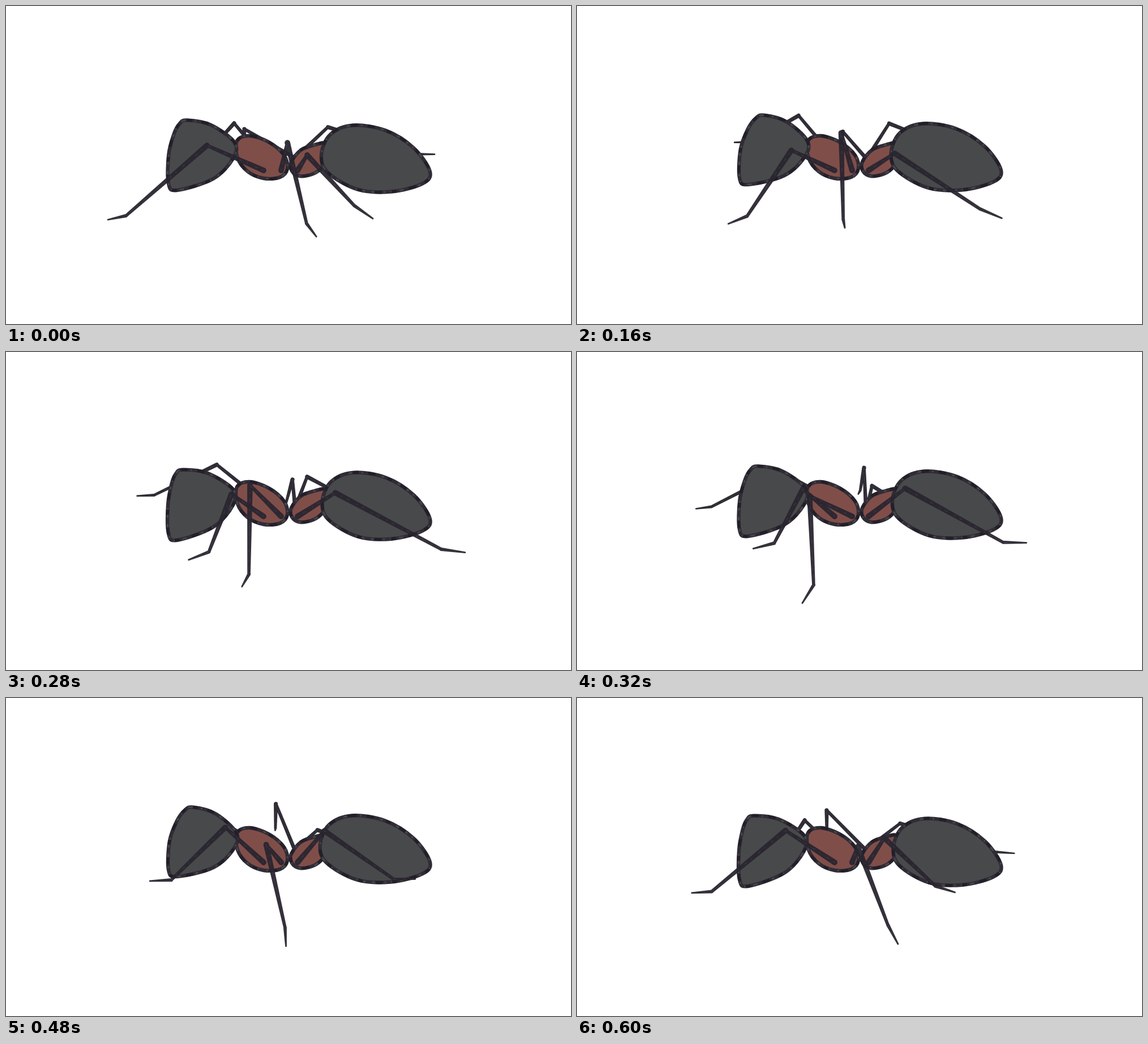
An HTML page with a canvas for the animation above (640 ms loop, 998x561 px).

```html
<!DOCTYPE html>
<html lang="en">
<head>
<meta charset="utf-8">
<title>Walking ant</title>
<style>
html, body { margin: 0; width: 100%; height: 100%; overflow: hidden; background: #fff; }
canvas { display: block; width: 998px; height: 561px; }
</style>
</head>
<body>
<canvas id="stage" width="998" height="561"></canvas>
<script>
const ctx = document.getElementById('stage').getContext('2d');
const STEP = 40, STEPS = 16;
const INK = '#302c35', DARK = '#231f2a', GREY = '#47454c', SHELL = '#48494a', RED = '#804e49';
const NEAR_INK = 'rgba(42,37,48,.95)';
const NEAR_RADII = [5, 3, 4.9, 2.8, 3, 1.4], FAR_RADII = [3.4, 2.8, 3.6, 2.4, 2.5, 1.3];

// Every joint glides in a line [from, to] while the foot is planted, then swings back raised by lift.
// The far twin walks half a stride later, shifted, with the part below the knee flattened.
const legs = [
  { hip: [455, 290], start: 0, plant: 6.6,
    knee: { from: [355, 246], to: [394, 260], lift: [16, -24] },
    ankle: { from: [212, 370], to: [358, 371], lift: [18, -50] },
    toe: { from: [180, 377], to: [324, 389], lift: [13, -60] },
    far: { hip: [445, 257], shift: [4, -35], flat: [.85, .5] } },
  { hip: [486, 290], start: 8, plant: 7,
    knee: { from: [411, 254], to: [496, 262], lift: [18, -34] },
    ankle: { from: [418, 411], to: [549, 400], lift: [-6, -30] },
    toe: { from: [398, 443], to: [567, 434], lift: [0, -48] },
    far: { hip: [510, 268], shift: [10, -37], flat: [-.2, .28] } },
  { hip: [515, 290], start: 0, plant: 6.6,
    knee: { from: [532, 263], to: [580, 258], lift: [10, -27] },
    ankle: { from: [615, 352], to: [775, 362], lift: [2, -37] },
    toe: { from: [648, 375], to: [817, 374], lift: [3, -56] },
    far: { hip: [515, 264], shift: [-11, -27], flat: [.88, .5] } }];

const head = [[325, 197], [366, 207], [405, 239], [402, 267], [366, 302],
  [302, 320], [287, 308], [288, 258], [299, 222], [311, 203]];
const abdomen = [[612, 209], [670, 218], [720, 249], [749, 291], [735, 312],
  [680, 326], [620, 322], [567, 292], [556, 260], [572, 225]];
const thorax = [[408, 238], [430, 229], [464, 240], [491, 263], [497, 287],
  [484, 302], [455, 304], [427, 292], [409, 268]];
const waist = [[504, 275], [521, 254], [545, 245], [566, 243], [570, 268],
  [555, 288], [540, 297], [519, 300], [505, 291]];

const mix = (a, b, u) => a.map((v, i) => v + (b[i] - v) * u);

function glide({ from, to, lift }, time, plant) {
  if (time < plant) return mix(from, to, time / plant);
  const u = (time - plant) / (STEPS - plant);
  const rise = Math.sqrt(Math.sin(Math.PI * u));
  return mix(to, from, u).map((v, i) => v + lift[i] * rise);
}

function joints(leg, step) {
  const time = (step - leg.start + STEPS) % STEPS;
  return [leg.knee, leg.ankle, leg.toe].map(j => glide(j, time, leg.plant));
}

function farJoints(leg, step) {
  const pose = joints(leg, (step + STEPS / 2) % STEPS), knee = pose[0];
  const { shift, flat } = leg.far;
  return pose.map(p => p.map((v, i) => knee[i] + shift[i] + flat[i] * (v - knee[i])));
}

function closedCurve(points) {
  const n = points.length, at = k => points[(k + n) % n];
  ctx.beginPath();
  ctx.moveTo(...points[0]);
  for (let i = 0; i < n; i++) {
    const [a, b, c, d] = [at(i - 1), at(i), at(i + 1), at(i + 2)];
    ctx.bezierCurveTo(b[0] + (c[0] - a[0]) / 6, b[1] + (c[1] - a[1]) / 6,
      c[0] - (d[0] - b[0]) / 6, c[1] - (d[1] - b[1]) / 6, ...c);
  }
  ctx.closePath();
}

function strokeLine(color, width, dash) {
  ctx.strokeStyle = color;
  ctx.lineWidth = width;
  ctx.setLineDash(dash);
  ctx.stroke();
}

// Filled shape with a patchy marker outline
function blob(points, fill) {
  closedCurve(points);
  ctx.fillStyle = fill;
  ctx.fill();
  strokeLine(INK, 6.4, []);
  strokeLine(GREY, 3, [5, 9, 3, 14, 8, 11]);
  strokeLine(DARK, 5.4, [9, 17, 13, 22]);
}

function taper([x0, y0], r0, [x1, y1], r1) {
  const a = Math.atan2(y1 - y0, x1 - x0), q = Math.PI / 2;
  ctx.moveTo(x0 + r0 * Math.cos(a + q), y0 + r0 * Math.sin(a + q));
  ctx.arc(x0, y0, r0, a + q, a + 3 * q);
  ctx.arc(x1, y1, r1, a - q, a + q);
  ctx.closePath();
}

// radii: start and end of every segment
function limb(points, radii, color) {
  ctx.beginPath();
  for (let i = 0; i + 1 < points.length; i++)
    taper(points[i], radii[2 * i], points[i + 1], radii[2 * i + 1]);
  ctx.fillStyle = color;
  ctx.fill();
  ctx.beginPath();
  points.forEach(p => ctx.lineTo(...p));
  strokeLine('rgba(76,74,82,.4)', 1.6, [3, 8, 6, 13]);
}

// The head tips up most at its top and front
function nodHead([x, y], nod) {
  const height = (328 - y) / 128, front = (410 - x) / 100;
  return [x + 13 * nod * height ** 3, y - nod * (3 + 10 * Math.min(1, front))];
}

function draw(step) {
  // The body bobs twice per stride
  const nod = Math.cos((step - 2.5) / STEPS * 4 * Math.PI);
  ctx.fillStyle = '#fff';
  ctx.fillRect(0, 0, 998, 561);
  ctx.lineJoin = 'round';

  for (const leg of legs) limb([leg.far.hip, ...farJoints(leg, step)], FAR_RADII, INK);

  blob(thorax, RED);
  blob(waist, RED);
  blob(abdomen.map(([x, y]) => [x - 3 * nod * (752 - x) / 200, y - 4 * nod]), SHELL);
  blob(head.map(p => nodHead(p, nod)), SHELL);

  for (const leg of legs) limb([leg.hip, ...joints(leg, step)], NEAR_RADII, NEAR_INK);
}

const start = performance.now();
function tick() {
  draw(Math.floor(Math.max(0, performance.now() - start) / STEP) % STEPS);
  requestAnimationFrame(tick);
}
tick();
</script>
</body>
</html>
```
